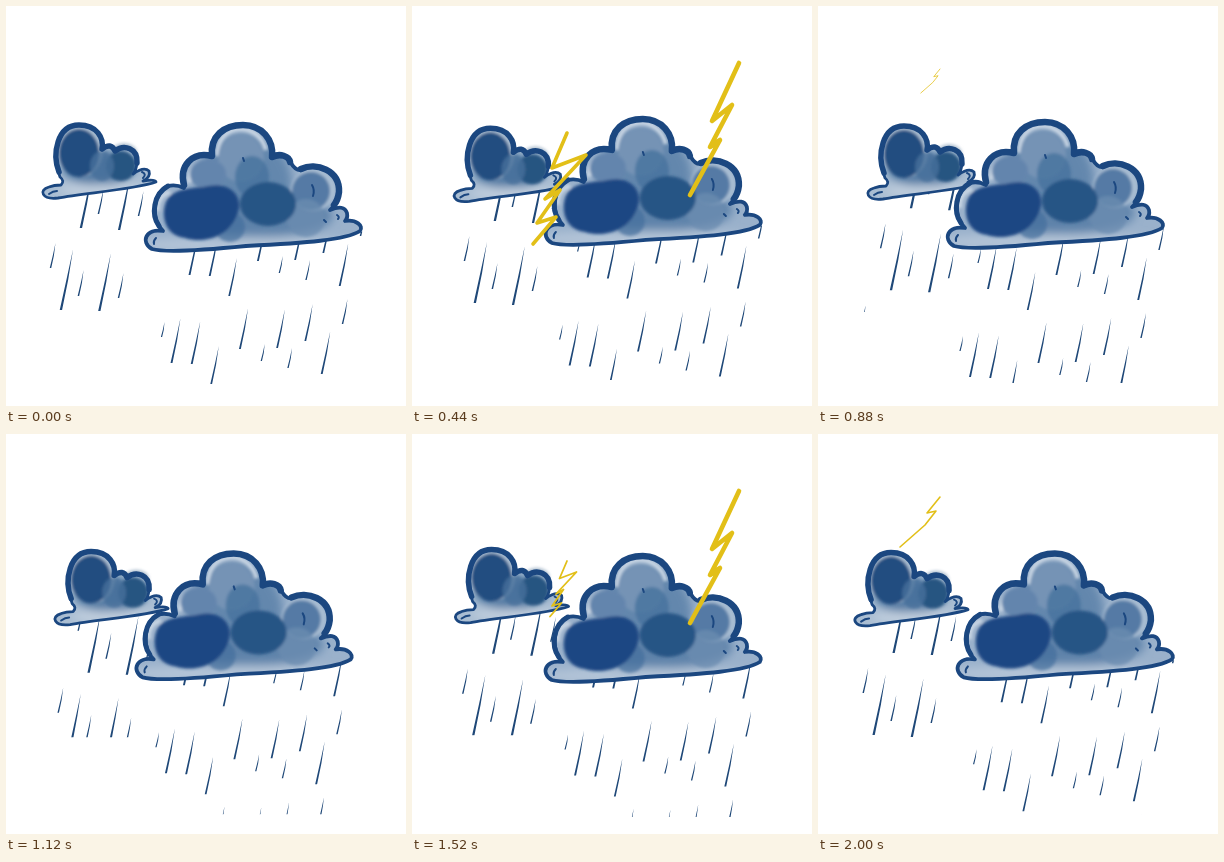
An HTML page that plays this animation: 400 px wide and 400 px high, repeating every 2.04 s.

```html
<!DOCTYPE html>
<html lang="en">
<head>
<meta charset="utf-8">
<title>Storm clouds</title>
<style>
  html, body { margin: 0; width: 100%; height: 100%; overflow: hidden; background: #fff; }
  svg { display: block; width: 100vw; height: 100vh; }
  .ink { fill: none; stroke: #1b4780; stroke-linecap: round; stroke-linejoin: round; }
  .rain { fill: #1f4878; }
  .bolt { fill: none; stroke: #e2bf18; stroke-linecap: round; stroke-linejoin: round; }
</style>
</head>
<body>
<svg viewBox="0 0 400 400">
  <defs>
    <filter id="soft"><feGaussianBlur stdDeviation="1.6"/></filter>
    <filter id="wash" x="-30%" y="-30%" width="160%" height="160%"><feGaussianBlur stdDeviation="5"/></filter>
    <path id="smallShape" d="M55 179Q59 175 54 171C46 150 50 119 73 119C91 119 98 132 96 144Q106 135 109 146C118 137 132 142 131 157Q130 165 127 168Q138 160 143 165Q145 171 137 175Q149 173 150 176C130 183 80 187 52 192C36 194 32 184 43 181Q48 179 55 179Z"/>
    <path id="bigShape" d="M157 225C145 214 146 188 162 180Q170 178 178 182C172 160 186 144 206 150C204 130 218 119 237 119C256 119 268 134 266 152C274 146 284 150 285 157Q289 164 294 164C310 155 334 164 333 186Q332 198 324 204Q338 198 341 207Q342 212 339 215C350 213 358 220 354 225C340 234 300 237 240 240C200 244 160 247 146 243C134 236 140 222 157 225Z"/>
    <clipPath id="smallClip"><use href="#smallShape"/></clipPath>
    <clipPath id="bigClip"><use href="#bigShape"/></clipPath>
    <clipPath id="smallFall"><path d="M20 191L60 190L120 182L170 174V305H20Z"/></clipPath>
    <clipPath id="bigFall"><path d="M120 244L240 240L335 231L375 221V380H120Z"/></clipPath>
  </defs>

  <g id="small">
    <g clip-path="url(#smallFall)"><path class="rain"/></g>
    <ellipse cx="118" cy="146" rx="13" ry="9" fill="#b5c4d3" filter="url(#soft)"/>
    <use href="#smallShape" fill="#a9bdd2"/>
    <g clip-path="url(#smallClip)">
      <g filter="url(#wash)">
        <ellipse cx="92" cy="162" rx="36" ry="17" fill="#5078a2"/>
        <ellipse cx="98" cy="184" rx="45" ry="6" fill="#c3d0df"/>
      </g>
      <g filter="url(#soft)">
        <ellipse cx="74" cy="144" rx="23" ry="27" fill="#a8bcd0"/>
        <ellipse cx="73" cy="147" rx="20" ry="24" fill="#224d80"/>
        <ellipse cx="115" cy="160" rx="15" ry="15" fill="#265481"/>
        <ellipse cx="96" cy="160" rx="12" ry="15" fill="#47709b" opacity=".8"/>
      </g>
    </g>
    <g class="ink">
      <use href="#smallShape" stroke-width="2.8"/>
      <path stroke-width="5.5" d="M53 166C46 148 51 119 73 119C91 119 98 132 96 143Q105 136 109 145C118 138 132 142 131 157"/>
      <path stroke-width="2" d="M43 188Q47 185 51 185M136 166Q141 168 137 172"/>
    </g>
  </g>

  <g id="big">
    <g clip-path="url(#bigFall)"><path class="rain"/></g>
    <use href="#bigShape" fill="#9ab1cb"/>
    <g clip-path="url(#bigClip)">
      <g filter="url(#wash)">
        <ellipse cx="238" cy="177" rx="48" ry="48" fill="#6487ad"/>
        <ellipse cx="247" cy="210" rx="80" ry="22" fill="#5f83aa"/>
        <ellipse cx="240" cy="239" rx="115" ry="8" fill="#b4c5d8"/>
      </g>
      <g filter="url(#soft)">
        <path d="M211 150C211 116 252 114 260 144M183 177Q183 158 200 155M152 205Q151 190 164 186" fill="none" stroke="#c9d6e4" stroke-width="4"/>
        <ellipse cx="235" cy="152" rx="23" ry="24" fill="#7493b5"/>
        <ellipse cx="202" cy="168" rx="18" ry="15" fill="#6485ad"/>
        <ellipse cx="246" cy="171" rx="17" ry="21" fill="#45709c" opacity=".75"/>
        <ellipse cx="307" cy="184" rx="22" ry="21" fill="#a9bed3"/>
        <ellipse cx="305" cy="185" rx="19" ry="19" fill="#557aa5"/>
        <circle cx="300" cy="212" r="19" fill="#6b8cb0" opacity=".75"/>
        <circle cx="224" cy="221" r="15" fill="#456e9c" opacity=".7"/>
        <ellipse cx="262" cy="198" rx="28" ry="22" fill="#285585"/>
        <path d="M160 196C168 180 190 183 202 180C222 176 234 187 233 201C229 228 201 239 179 232C161 230 154 213 160 196Z" fill="#1e4683"/>
      </g>
    </g>
    <g class="ink">
      <use href="#bigShape" stroke-width="3.8"/>
      <path stroke-width="6.5" d="M178 179C173 160 186 145 206 150C204 130 218 119 237 119C256 119 268 134 266 151C274 147 283 150 284 156M295 163C310 156 334 164 333 186Q332 194 328 199"/>
      <path stroke-width="5" d="M153 220C145 209 147 188 162 180"/>
      <path stroke-width="2" d="M306 179Q309 184 307 190M237 152l1 3M331 209q3 2 1 4M318 214l2 2M150 232q-3 3-2 6"/>
    </g>
  </g>
  <g id="bolts"></g>
</svg>
<script>
const LOOP = 2040, STEP = 40;
const $ = s => document.querySelector(s);

// Drops: [x of the middle, top, bottom]
const smallDrops = [[47, 237, 262], [61, 243, 304], [75, 264, 290], [99, 247, 306], [115, 267, 292]];
const bigDrops = [[157, 316, 331], [170, 312, 357], [190, 315, 358], [209, 340, 378], [238, 302, 343],
  [257, 338, 355], [275, 303, 342], [284, 342, 362], [303, 298, 335], [320, 325, 368], [339, 293, 318]];

function dropPath([x, top, end], dx, dy) {
  const h = end - top, w = 0.45 + h / 85, lean = h * 0.1;
  const mid = (top + end) / 2 + dy, cx = x + dx + 0.7;
  const bx = x + dx - lean, by = end + dy;
  return `M${x + dx + lean} ${top + dy}Q${cx + w} ${mid} ${bx + w} ${by}h${-2 * w}Q${cx - w} ${mid} ${x + dx + lean} ${top + dy}Z`;
}

// Three identical rows, one fall distance apart; sliding by one row repeats the pattern.
function makeRain(id, drops, dx, dy, period) {
  const path = $(id + ' .rain');
  path.setAttribute('d', [-2, -1, 0].map(k => drops.map(d => dropPath(d, k * dx, k * dy)).join('')).join(''));
  return t => {
    const f = t / period % 1;
    path.setAttribute('transform', `translate(${f * dx} ${f * dy})`);
  };
}

// Smooth cyclic drift through equally indexed keys
const times = [0, 280, 600, 880, 1320, 1720, LOOP];
function drift(values) {
  const n = values.length;
  const T = i => times[(i + n) % n] + Math.floor(i / n) * LOOP;
  const V = i => values[(i + n) % n];
  const slope = i => (V(i + 1) - V(i - 1)) / (T(i + 1) - T(i - 1));
  return t => {
    let i = 0;
    while (i < n - 1 && t >= times[i + 1]) i++;
    const h = T(i + 1) - T(i), u = (t - T(i)) / h, v = 1 - u;
    return v * v * (1 + 2 * u) * V(i) + u * u * (3 - 2 * u) * V(i + 1)
      + h * u * v * (v * slope(i) - u * slope(i + 1));
  };
}

function makeCloud(id, xs, ys, rain) {
  const el = $(id), x = drift(xs), y = drift(ys);
  return t => {
    el.setAttribute('transform', `translate(${x(t)} ${y(t)})`);
    rain(t);
  };
}

// Bolts grow from their upper tip: tip, path from the tip, width, [time, scale] keys
const bolts = [
  [155, 127, 'l-15 35L19 22L-22 66L-7 57L-30 90L-11 84L-34 111', 3.6, [[180, 0], [280, .67], [300, 1], [460, 1], [540, 0]]],
  [327, 57, 'L-27 58L-7 42L-29 84L-19 77L-49 132', 4.6, [[260, 0], [280, .19], [300, .5], [380, 1], [620, 1], [680, 0]]],
  [368, 161, 'L-18 23L-2 19L-11 37L-28 51', 2.5, [[560, 0], [600, .4], [700, 1], [800, 1], [860, 0]]],
  [122, 63, 'L-13 16L-4 14L-15 28L-40 50', 1.6, [[660, 0], [700, .22], [880, .48], [980, 1], [1019, 0]]]
].map(([x, y, d, width, keys]) => {
  const el = document.createElementNS('http://www.w3.org/2000/svg', 'path');
  el.setAttribute('class', 'bolt');
  el.setAttribute('d', 'M0 0' + d.replace('l', 'L'));
  el.setAttribute('stroke-width', width);
  $('#bolts').append(el);
  return t => {
    const u = t % (LOOP / 2);
    const i = keys.findIndex(k => k[0] > u);
    let s = 0;
    if (i > 0) {
      const [t0, a] = keys[i - 1], [t1, b] = keys[i];
      s = a + (b - a) * (u - t0) / (t1 - t0);
    }
    el.setAttribute('visibility', s > 0 ? 'visible' : 'hidden');
    el.setAttribute('transform', `translate(${x} ${y}) scale(${s})`);
  };
});

const parts = [
  makeCloud('#small', [0, 3, 8, 13, 10, 3], [0, 2.5, 3.5, 1, -3, -3],
    makeRain('#small', smallDrops, -20, 82, 504)),
  makeCloud('#big', [0, -4, -8, -10, -8, -4], [0, -4, -7, -3, 2.5, 2.5],
    makeRain('#big', bigDrops, -18, 88, 401)),
  ...bolts
];

const start = performance.now();
function draw() {
  const t = Math.floor((performance.now() - start) % LOOP / STEP) * STEP;
  parts.forEach(part => part(t));
  requestAnimationFrame(draw);
}
draw();
</script>
</body>
</html>
```
